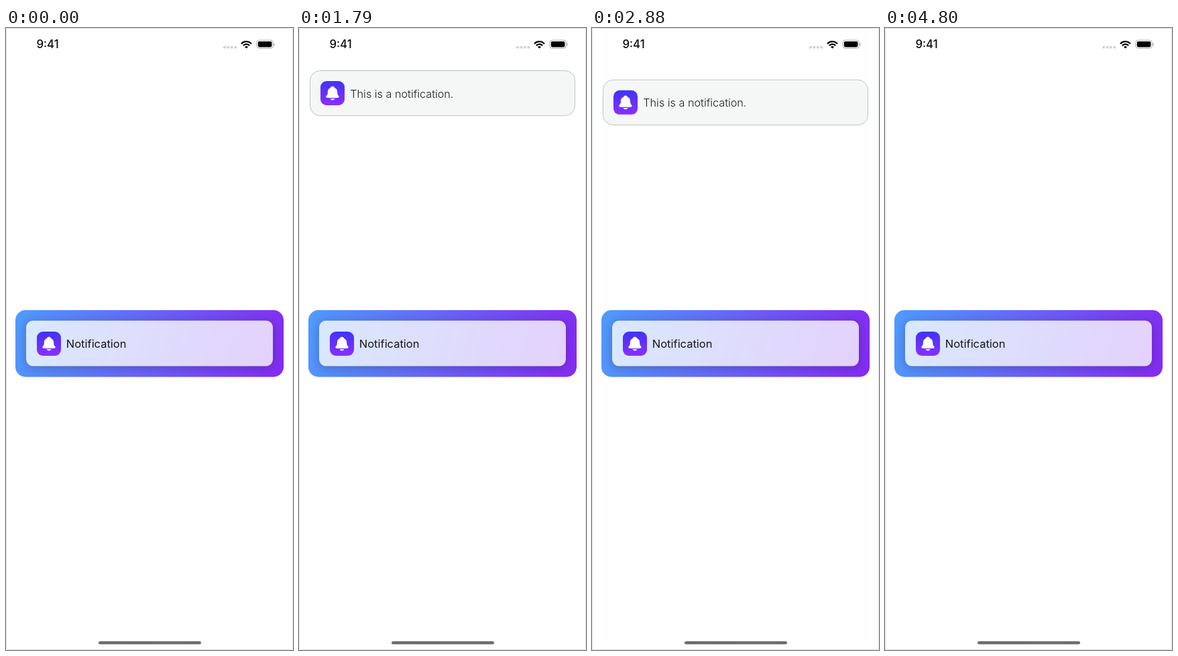
An HTML page with a canvas that plays this animation: 428 px wide and 926 px high, repeating every 5.17 s.

```html
<!DOCTYPE html>
<html lang="en">
<head>
<meta charset="utf-8">
<title>Notification</title>
<style>
html, body { margin: 0; width: 100%; height: 100%; overflow: hidden; background: #fff; }
canvas { display: block; }
</style>
</head>
<body>
<canvas id="stage" width="428" height="926"></canvas>
<script>
const ctx = document.getElementById('stage').getContext('2d');
const LOOP = 5170;
const FONT = 'Inter, "Noto Sans", sans-serif';
const REST_TOP = 63.5;

// The screen refreshes only at these moments (ms).
const TICKS = [
  0, 580, 680, 780, 880, 960, 1080, 1170, 1290, 1380, 1480, 1580,
  2170, 2290, 2380, 2500, 2590, 2670, 2790, 2880, 3000, 3090, 3170, 3290,
  4090, 4300, 4380, 4500, 4590
];

const bell = new Path2D(
  'M0-10.3C-1.4-10.3-2.5-9.4-2.9-8.1C-5.5-7-6.8-5-6.8-1.8C-6.8 1.7-7.5 2.5-8.5 3.7' +
  'L-8.8 4.1C-9.8 5.3-9 6.9-7.4 6.9H7.4C9 6.9 9.8 5.3 8.8 4.1L8.5 3.7' +
  'C7.5 2.5 6.8 1.7 6.8-1.8C6.8-5 5.5-7 2.9-8.1C2.5-9.4 1.4-10.3 0-10.3Z' +
  'M-3.4 8.3H3.4C2 11.1-2 11.1-3.4 8.3Z');

const clamp = p => Math.min(1, Math.max(0, p));
const progress = (t, from, to) => clamp((t - from) / (to - from));
const easeInOut = p => p < 0.5 ? 2 * p * p : 1 - 2 * (1 - p) ** 2;
const springLeft = x => x <= 0 ? 1 : (1 + x) * Math.exp(-x);

function box(x, y, w, h, r) {
  const path = new Path2D();
  path.roundRect(x, y, w, h, r);
  return path;
}

function gradient(x0, y0, x1, y1, from, to) {
  const g = ctx.createLinearGradient(x0, y0, x1, y1);
  g.addColorStop(0, from);
  g.addColorStop(1, to);
  return g;
}

function fill(path, style) {
  ctx.fillStyle = style;
  ctx.fill(path);
}

function label(text, x, y, size, weight, color) {
  ctx.font = `${weight} ${size}px ${FONT}`;
  ctx.fillStyle = color;
  ctx.fillText(text, x, y);
}

function bellIcon(x, y) {
  fill(box(x, y, 36, 36, 9), gradient(x, y, x, y + 36, '#4033f8', '#8a2eff'));
  ctx.save();
  ctx.translate(x + 18, y + 18);
  ctx.scale(1.05, 1);
  fill(bell, '#fff');
  ctx.restore();
}

function buttonOpacity(t) {
  const pressed = easeInOut(progress(t, 545, 695));
  const released = easeInOut(progress(t, 935, 1185));
  return 1 - 0.8 * (pressed - released);
}

function bannerTop(t) {
  if (t < 1580) return REST_TOP - 131 * springLeft((t - 771) * 0.0085);
  if (t < 2720) return REST_TOP + 29 * Math.sin(progress(t, 2120, 2670) * Math.PI / 2);
  if (t < 3290) return REST_TOP + 29 * springLeft((t - 2720) * 0.011);
  const drag = 5.5 * progress(t, 4030, 4090);
  const p = progress(t, 4230, 4590);
  return REST_TOP - drag - 130 * p * p * (3 - 2 * p);
}

function drawButton(alpha) {
  const card = box(30, 435.5, 368, 68, 10);
  ctx.save();
  ctx.globalAlpha = alpha;
  fill(box(14, 420, 400, 99.5, 15), gradient(14, 420, 414, 520, '#4f9cff', '#852af4'));

  // The shadow stays outside the card.
  ctx.save();
  const outside = box(14, 420, 400, 99.5, 15);
  outside.addPath(card);
  ctx.clip(outside, 'evenodd');
  ctx.shadowColor = 'rgba(0,0,0,0.24)';
  ctx.shadowBlur = 16;
  ctx.shadowOffsetY = 2;
  fill(card, '#000');
  ctx.restore();

  fill(card, 'rgba(255,255,255,0.78)');
  // While faded, the shadow shows through the card.
  fill(card, `rgba(0,0,0,${0.25 * (1 - alpha)})`);
  bellIcon(46, 452);
  label('Notification', 89.8, 475.8, 16.5, 400, '#15151f');
  ctx.restore();
}

function drawBanner(top, t) {
  if (top < -68) return;
  const panel = box(16.5, top, 395, 67, 15);
  fill(panel, '#f5f7f7');
  ctx.strokeStyle = '#b9c4c6';
  ctx.lineWidth = 1;
  ctx.stroke(panel);

  ctx.save();
  if (t < 1170 && top > 0) {
    ctx.beginPath();
    ctx.rect(0, 50, 428, 876);
    ctx.clip();
  }
  bellIcon(32, top + 15.5);
  ctx.restore();
  label('This is a notification.', 76.3, top + 40, 16.2, 300, '#1c1c1e');
}

function drawWifi() {
  const x = 358.5, y = 30.5;
  ctx.strokeStyle = '#000';
  ctx.lineWidth = 2.3;
  for (const r of [6.4, 10.3]) {
    ctx.beginPath();
    ctx.arc(x, y, r, -Math.PI * 0.76, -Math.PI * 0.24);
    ctx.stroke();
  }
  ctx.fillStyle = '#000';
  ctx.beginPath();
  ctx.moveTo(x, y);
  ctx.arc(x, y, 3.4, -Math.PI * 0.76, -Math.PI * 0.24);
  ctx.fill();
}

function drawStatusBar() {
  label('9:41', 45.4, 30, 16.8, 500, '#0a0a0a');
  for (let i = 0; i < 4; i++) fill(box(324.2 + i * 5.4, 27, 3.6, 3.6, 1), '#cfcfcf');
  drawWifi();
  ctx.strokeStyle = '#a9a9a9';
  ctx.lineWidth = 1;
  ctx.stroke(box(373.9, 18.2, 24.4, 12, 3.6));
  fill(box(375.8, 20, 20.6, 8.4, 1.8), '#000');
  fill(box(399.3, 22.4, 1.4, 4, 0.7), '#b0b0b0');
}

function drawFrame() {
  ctx.strokeStyle = '#dde2e3';
  ctx.lineWidth = 1;
  ctx.strokeRect(0.5, 0.5, 427, 925);
  const bar = gradient(138, 0, 291, 0, '#6c6c6c', '#6c6c6c');
  bar.addColorStop(0.8, '#707070');
  bar.addColorStop(1, '#a0a0a0');
  fill(box(138, 913, 153, 4.6, 2.3), bar);
}

function render(now) {
  const time = now % LOOP;
  const t = TICKS.findLast(tick => tick <= time);
  ctx.fillStyle = '#fff';
  ctx.fillRect(0, 0, 428, 926);
  drawButton(buttonOpacity(t));
  drawBanner(bannerTop(t), t);
  drawStatusBar();
  drawFrame();
}

const start = performance.now();
function loop() {
  render(performance.now() - start);
  requestAnimationFrame(loop);
}
loop();
</script>
</body>
</html>
```
